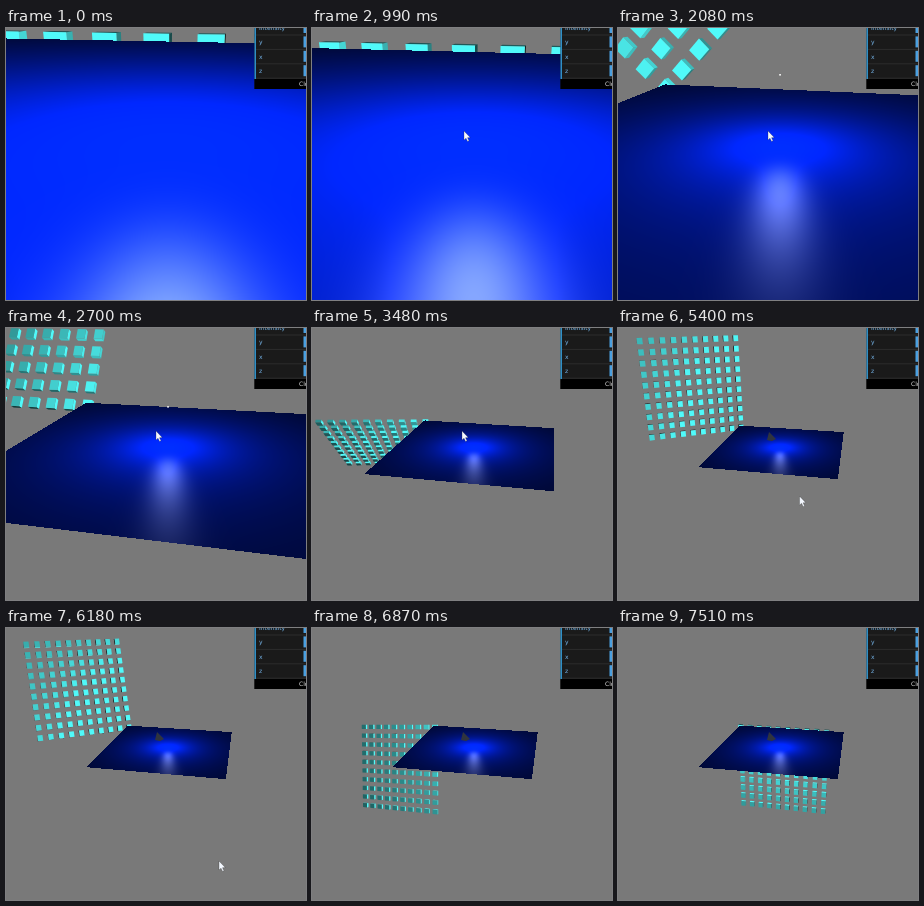
An HTML page with a canvas that plays this animation: 300x272 px, repeating every 7.58 s.

```html
<!DOCTYPE html>
<html>
<head>
<meta charset="utf-8">
<style>
html, body { margin: 0; width: 100%; height: 100%; overflow: hidden; background: #797979; }
canvas { display: block; }
</style>
</head>
<body>
<canvas id="stage" width="300" height="272"></canvas>
<script>
const LOOP = 7580, WIDTH = 300, HEIGHT = 272;
const CX = 162, CY = 119.5, FOCAL = 380;
const ctx = document.getElementById('stage').getContext('2d');
const floorCanvas = document.createElement('canvas');
floorCanvas.width = WIDTH;
floorCanvas.height = HEIGHT;
const floorCtx = floorCanvas.getContext('2d');
const floorImage = floorCtx.createImageData(WIDTH, HEIGHT);

const add = (a, b, k = 1) => a.map((x, i) => x + b[i] * k);
const scale = (a, k) => a.map(x => x * k);
const dot = (a, b) => a[0] * b[0] + a[1] * b[1] + a[2] * b[2];
const unit = a => scale(a, 1 / Math.hypot(...a));
const cross = (a, b) => [
  a[1] * b[2] - a[2] * b[1], a[2] * b[0] - a[0] * b[2], a[0] * b[1] - a[1] * b[0]
];
const ramp = (t, from, to) => Math.min(1, Math.max(0, (t - from) / (to - from)));

// Camera space: x right, y down, z away, with the floor centre at zero.
const SIDE = [59.4, 4.3, -11.4], FRONT = [-12.15, 21.6, -58];
const UP = unit(cross(FRONT, SIDE));
const BASIS = [unit(SIDE), UP, unit(FRONT)];
const LIGHT = scale(UP, 16.5);
const PIVOT = [-46, -24, 68];
const COUNT = 10, STEP = 11.2;

function cameraDistance(t) {
  const s = t / 1000;
  return Math.exp(Math.max(-2.93, Math.min(0, 0.86 * s - 3.25, s - 3.56)));
}

// Turns a floor direction [side, up, front] by yaw, then roll, into camera space.
function turn([x, y, z], yaw, roll) {
  const cy = Math.cos(yaw), sy = Math.sin(yaw), cr = Math.cos(roll), sr = Math.sin(roll);
  [x, z] = [x * cy + z * sy, z * cy - x * sy];
  [x, y] = [x * cr + y * sr, y * cr - x * sr];
  return add(add(scale(BASIS[0], x), BASIS[1], y), BASIS[2], z);
}

function gridBoxes(t) {
  const degree = Math.PI / 180, last = ramp(t, 6300, 7400), rise = ramp(t, 4790, 5500);
  const roll = 180 * degree * (1 - ramp(t, 1000, 2440) - last);
  const yaw = degree * (22 * ramp(t, 2800, 4000) + 13 * rise - 35 * last);
  const tilt = -degree * (135 * ramp(t, 2440, 3480) + 140 * ramp(t, 3480, 4000) + 105 * rise - 20 * last);
  const u = turn([-1, 0, 0], yaw, roll);
  const v = turn([0, Math.cos(tilt), Math.sin(tilt)], yaw, roll);
  const axes = [scale(u, 2.7), scale(v, 3.1), scale(cross(u, v), 1.5)];
  const boxes = [];
  for (let i = 0; i < COUNT; i++) for (let j = 0; j < COUNT; j++) {
    boxes.push({ center: add(add(PIVOT, u, i * STEP), v, j * STEP), axes });
  }
  return boxes.sort((a, b) => b.center[2] - a.center[2]);
}

function project(p, dist) {
  const w = dist + p[2] / FOCAL;
  return [CX + p[0] / w, CY + p[1] / w, w];
}

function polygon(points, fill) {
  ctx.beginPath();
  points.forEach(p => ctx.lineTo(p[0], p[1]));
  ctx.closePath();
  ctx.fillStyle = fill;
  ctx.fill();
}

function rect(x, y, w, h, fill) {
  ctx.fillStyle = fill;
  ctx.fillRect(x, y, w, h);
}

// Traces each pixel back to the floor and shades it under the point light.
function drawFloor(dist) {
  const data = floorImage.data;
  const sideW = SIDE[2] / FOCAL, frontW = FRONT[2] / FOCAL, eyeZ = -FOCAL * dist;
  data.fill(0);
  for (let y = 0; y < HEIGHT; y++) for (let x = 0; x < WIDTH; x++) {
    const px = x + 0.5 - CX, py = y + 0.5 - CY;
    const a = SIDE[0] - px * sideW, b = FRONT[0] - px * frontW;
    const c = SIDE[1] - py * sideW, d = FRONT[1] - py * frontW;
    const det = a * d - b * c;
    const s = dist * (px * d - b * py) / det, t = dist * (a * py - c * px) / det;
    if (Math.abs(s) > 1 || Math.abs(t) > 1 || dist + s * sideW + t * frontW <= 0) continue;

    const X = SIDE[0] * s + FRONT[0] * t;
    const Y = SIDE[1] * s + FRONT[1] * t;
    const Z = SIDE[2] * s + FRONT[2] * t;
    const lx = LIGHT[0] - X, ly = LIGHT[1] - Y, lz = LIGHT[2] - Z;
    const l = Math.hypot(lx, ly, lz), e = Math.hypot(X, Y, eyeZ - Z);
    const diffuse = (lx * UP[0] + ly * UP[1] + lz * UP[2]) / l;
    const hx = lx / l - X / e, hy = ly / l - Y / e, hz = lz / l + (eyeZ - Z) / e;
    const facing = (hx * UP[0] + hy * UP[1] + hz * UP[2]) / Math.hypot(hx, hy, hz);
    const shine = 190 * diffuse * Math.pow(Math.max(0, facing), 40);
    const i = 4 * (y * WIDTH + x);
    data[i] = shine;
    data[i + 1] = 46 * diffuse + shine;
    data[i + 2] = 300 * diffuse + shine;
    data[i + 3] = 255;
  }
  floorCtx.putImageData(floorImage, 0, 0);
  ctx.drawImage(floorCanvas, 0, 0);
}

function drawBox(center, axes, dist) {
  const eye = [0, 0, -FOCAL * dist];
  axes.forEach((axis, k) => {
    const p = axes[(k + 1) % 3], q = axes[(k + 2) % 3];
    for (const sign of [-1, 1]) {
      const normal = scale(unit(axis), sign), mid = add(center, axis, sign);
      if (dot(normal, add(mid, eye, -1)) >= 0) continue;
      const corners = [[-1, -1], [1, -1], [1, 1], [-1, 1]]
        .map(([m, n]) => project(add(add(mid, p, m), q, n), dist));
      if (corners.some(c => c[2] < 0.03)) continue;
      const lit = Math.min(1, 0.04 + 1.4 * Math.max(0, dot(normal, unit(add(LIGHT, mid, -1)))));
      polygon(corners, `rgb(${80 * lit},${250 * lit},${250 * lit})`);
    }
  });
}

function drawPanel() {
  rect(248.5, 0, 51.5, 61, '#1a1a1a');
  rect(248.5, 0, 1.5, 51, '#2f8fc6');
  ctx.font = '6px "DejaVu Sans", sans-serif';
  ['Intensity', 'y', 'x', 'z'].forEach((label, i) => {
    const y = 2 + i * 14.4;
    rect(250, y + 4.5, 50, 1, '#2c2c2c');
    rect(297.5, y - 8, 2.5, 11, '#4a9fe0');
    ctx.fillStyle = '#75b5ea';
    ctx.fillText(label, 253, y);
  });
  rect(248.5, 51, 51.5, 10, '#000');
  ctx.fillStyle = '#ddd';
  ctx.fillText('Close Controls', 293, 58);
}

function drawPointer(t) {
  if (t < 900) return;
  const move = ramp(t, 4900, 5900), leave = ramp(t, 6400, 6900);
  const x = 152 - 2 * ramp(t, 1000, 2080) + 63 * move + 12 * leave;
  const y = 103 + 130 * move + 42 * leave;
  const shape = [[0, 0], [0, 9], [2, 7.2], [3.6, 10.5], [5, 9.8], [3.5, 6.7], [6.2, 6.5]];
  polygon(shape.map(p => [x + p[0], y + p[1]]), '#f4f8ff');
  ctx.strokeStyle = '#2228';
  ctx.lineWidth = 0.5;
  ctx.stroke();
}

function draw(now) {
  const t = now % LOOP;
  const dist = cameraDistance(t);
  const boxes = gridBoxes(t);
  const above = b => dot(UP, b.center) >= 0;
  const show = b => drawBox(b.center, b.axes, dist);

  rect(0, 0, WIDTH, HEIGHT, '#797979');
  boxes.filter(b => !above(b)).forEach(show);
  drawFloor(dist);
  boxes.filter(above).forEach(show);

  const bulb = project(LIGHT, dist);
  if (dist < 0.5 && bulb[2] > 0.03) rect(bulb[0] - 0.8, bulb[1] - 0.8, 1.6, 1.6, '#fff');
  if (t > 4900) polygon([[151, 104], [158, 111], [154, 113], [149, 112]], '#30343e');
  drawPanel();
  drawPointer(t);
}

const start = performance.now();
function tick() {
  draw(performance.now() - start);
  requestAnimationFrame(tick);
}
tick();
</script>
</body>
</html>
```
